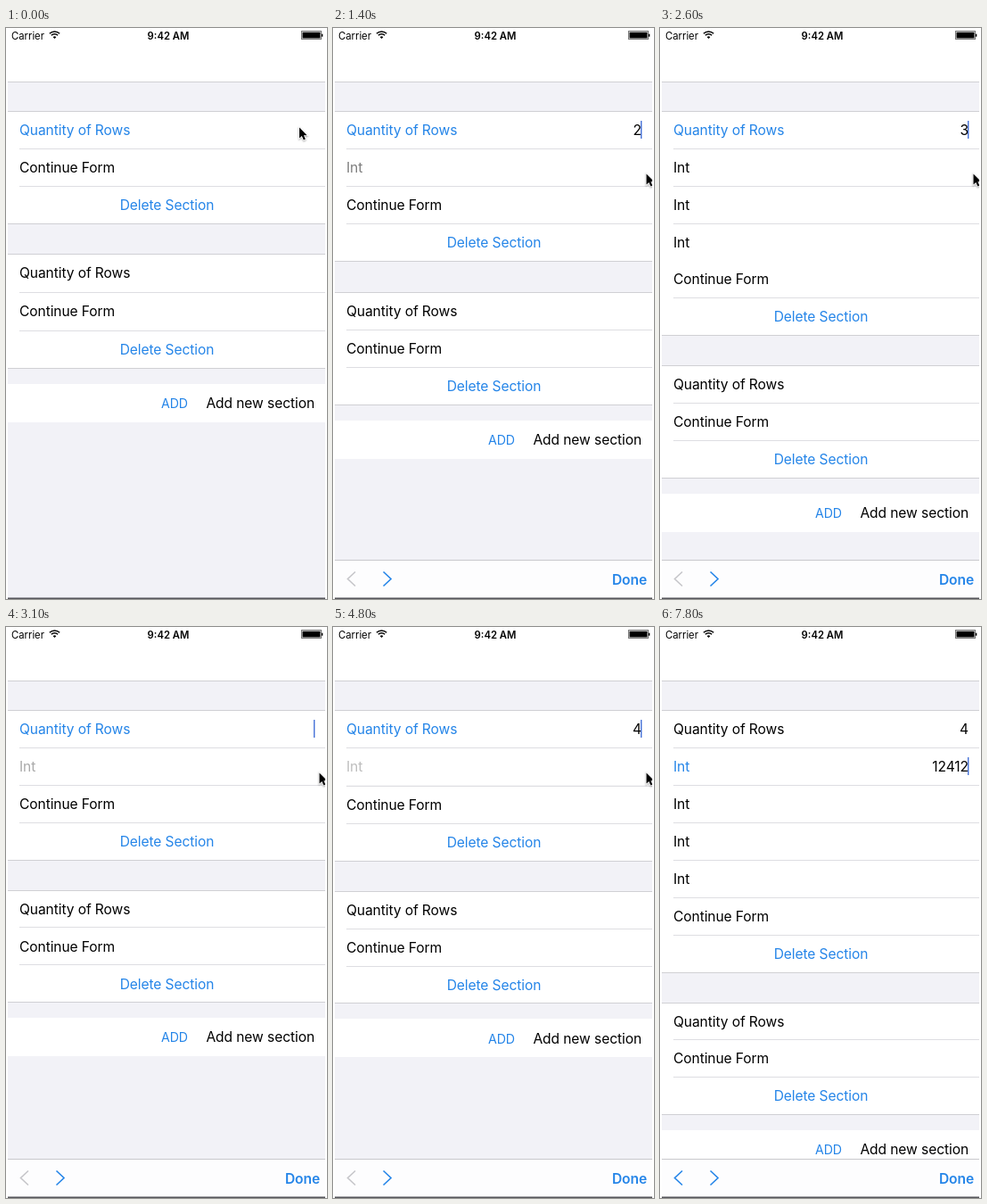
An HTML page with a canvas for the animation above (8 s loop, 360 by 640 pixels).

```html
<!DOCTYPE html>
<html lang="en">
<head>
<meta charset="utf-8">
<title>Dynamic form rows</title>
<style>
html, body { margin: 0; width: 100%; height: 100%; overflow: hidden; background: #fff; }
canvas { display: block; }
</style>
</head>
<body>
<canvas id="stage" width="360" height="640"></canvas>
<script>
const ctx = document.getElementById('stage').getContext('2d');
const LOOP = 8000, STEP = 100, ROW = 42, SLIDE = 360;
const BLUE = '#2585e8', GREY = '#f2f2f7', LINE = '#dedee2', EDGE = '#d0d0d4';

// [start time, rows before, rows after]
const slides = [[1218, 0, 2], [1773, 2, 0], [2250, 0, 3], [2880, 3, 0], [4680, 0, 4]];
// [time, text]
const quantity = [[0, ''], [1000, '2'], [1700, ''], [2200, '3'], [2800, ''], [4600, '4']];
const integer = [[0, ''], [5600, '1'], [5900, '12'], [7600, '124'], [7700, '1241'], [7800, '12412']];
// [time, x, y]
const pointer = [[0, 329, 111.5], [200, 329, 111.5], [700, 351.5, 163.5], [4900, 351.5, 163.5],
  [5200, 335, 117], [5300, 336, 147.5], [6500, 336, 147.5], [7100, 362, 111]];

const clamp = v => Math.min(1, Math.max(0, v));
const ease = v => { v = clamp(v); return v * v * (3 - 2 * v); };
const mix = (a, b, p) => a + (b - a) * p;
const latest = (list, t) => list.filter(item => item[0] <= t).pop();

function rect(x, y, w, h, color) {
  ctx.fillStyle = color;
  ctx.fillRect(x, y, w, h);
}

function text(str, x, y, { color = '#000', align = 'left', size = 15.6, weight = 400, gap = -0.1 } = {}) {
  ctx.font = `${weight} ${size}px Inter, Roboto, sans-serif`;
  ctx.letterSpacing = gap + 'px';
  ctx.textAlign = align;
  ctx.fillStyle = color;
  ctx.fillText(str, x, y + size * 0.365);
}

function stroke(points, color, width) {
  ctx.beginPath();
  points.forEach(([x, y]) => ctx.lineTo(x, y));
  ctx.strokeStyle = color;
  ctx.lineWidth = width;
  ctx.stroke();
}

const edge = y => rect(2, Math.floor(y), 356, 1, EDGE);

// One white table row whose top border sits at y
function cell(y, label, { color, centered, line = true, height = ROW } = {}) {
  const top = Math.floor(y);
  rect(2, top, 356, height, '#fff');
  if (line) rect(15, top, 343, 1, LINE);
  if (label) text(label, centered ? 180.5 : 15, y + 21, { color, align: centered ? 'center' : 'left' });
}

function deleteCell(y) {
  cell(y, 'Delete Section', { color: BLUE, centered: true });
}

function form(t) {
  const [start, from, to] = latest(slides, t) || [0, 0, 0];
  const rows = mix(from, to, ease((t - start) / SLIDE));
  const count = Math.max(from, to);
  const shift = rows * ROW;
  const slack = clamp(1 - t / 2800);
  const onInteger = t >= 5500;

  rect(2, 61, 356, 579, GREY);
  edge(60);
  cell(93, 'Quantity of Rows', { color: onInteger ? '#000' : BLUE, line: false });
  edge(93);
  text(latest(quantity, t)[1], 346, 114, { align: 'right' });

  if (rows > 0) {
    rect(2, 135, 356, count * ROW, '#fff');
    ctx.globalAlpha = rows / count;
    for (let i = 0; i < count; i++) {
      cell(135 + i * ROW, 'Int', { color: onInteger && !i ? BLUE : '#000' });
    }
    ctx.globalAlpha = 1;
    rect(15, 135, 343, 1, LINE);
  }
  text(latest(integer, t)[1], 346, 156, { align: 'right' });

  // Everything below the inserted rows slides over them
  rect(2, 219 + shift, 356, 640, GREY);
  cell(135 + shift, 'Continue Form', { line: Math.abs(rows - 3) > 0.02 });
  deleteCell(177 + shift);
  edge(219 + shift);

  const second = 253 + shift + slack * 0.7;
  cell(second, 'Quantity of Rows', { line: false, height: 44 });
  edge(second);
  cell(294.6 + shift + slack * 1.7, 'Continue Form', { height: 44 });
  deleteCell(336.6 + shift + slack * 2.7);
  edge(378.4 + shift + slack * 2.7);

  const add = 396.4 + shift + slack * 2.7;
  cell(add, '', { line: false, height: 43 });
  text('ADD', 174, add + 21.5, { color: BLUE, size: 14.2 });
  text('Add new section', 346, add + 21, { align: 'right' });

  if (t >= 200) {
    const dim = t >= 3400 && t < 4600 && Math.abs(t % 1000 - 500) <= 100;
    rect(345, onInteger ? 146 : 104, 1.4, 20, dim ? '#bdbdc2' : '#4470d8');
  }
}

function toolbar(t) {
  const y = mix(640, 597, ease((t - 100) / 400));
  rect(2, y, 356, 43, '#fdfdfe');
  rect(2, y - 1, 356, 1, '#c9c9cd');
  const mid = y + 20.5;
  stroke([[25, mid - 8], [16.5, mid], [25, mid + 8]], t >= 5500 ? BLUE : '#c6c6ca', 1.6);
  stroke([[56.5, mid - 8], [65, mid], [56.5, mid + 8]], BLUE, 1.6);
  text('Done', 352, y + 21, { color: BLUE, align: 'right', weight: 600 });
  rect(2, 638.5, 356, 1.5, '#55555a');
}

function statusBar() {
  rect(0, 0, 360, 60, '#fff');
  text('Carrier', 6, 8.4, { size: 11.3, gap: 0 });
  text('9:42 AM', 182, 8.4, { size: 11.3, weight: 600, align: 'center', gap: 0 });
  for (const r of [2.6, 5.2, 8]) {
    ctx.beginPath();
    ctx.arc(54.5, 12, r, -Math.PI * 0.75, -Math.PI * 0.25);
    if (r < 3) {
      ctx.lineTo(54.5, 12);
      ctx.fillStyle = '#000';
      ctx.fill();
    } else {
      ctx.strokeStyle = '#000';
      ctx.lineWidth = 1.5;
      ctx.stroke();
    }
  }
  ctx.strokeStyle = '#777';
  ctx.lineWidth = 1;
  ctx.strokeRect(331.5, 3.5, 22, 9);
  rect(332.5, 4.7, 20, 6.8, '#000');
  rect(354, 6.7, 1.3, 3, '#000');
}

function arrow(t) {
  const i = pointer.findIndex(p => p[0] > t);
  if (i < 0) return;
  const [t0, x0, y0] = pointer[i - 1], [t1, x1, y1] = pointer[i];
  const p = (t - t0) / (t1 - t0);
  ctx.save();
  ctx.beginPath();
  ctx.rect(2, 0, 356, 640);
  ctx.clip();
  ctx.translate(mix(x0, x1, p), mix(y0, y1, p));
  ctx.beginPath();
  for (const [x, y] of [[0, 0], [0, 12], [2.8, 9.5], [4.8, 14], [6.8, 13.1], [4.9, 8.7], [8.6, 8.7]]) ctx.lineTo(x, y);
  ctx.closePath();
  ctx.strokeStyle = '#fff';
  ctx.lineWidth = 1.6;
  ctx.shadowColor = 'rgba(0,0,0,.35)';
  ctx.shadowBlur = 2;
  ctx.shadowOffsetY = 1;
  ctx.stroke();
  ctx.shadowColor = 'transparent';
  ctx.fillStyle = '#000';
  ctx.fill();
  ctx.restore();
}

const begin = performance.now();

function draw() {
  const elapsed = (performance.now() - begin) % LOOP;
  const t = Math.floor(elapsed / STEP) * STEP;
  rect(0, 0, 360, 640, '#fff');
  form(t);
  toolbar(t);
  statusBar();
  arrow(t);
  requestAnimationFrame(draw);
}

draw();
</script>
</body>
</html>
```
